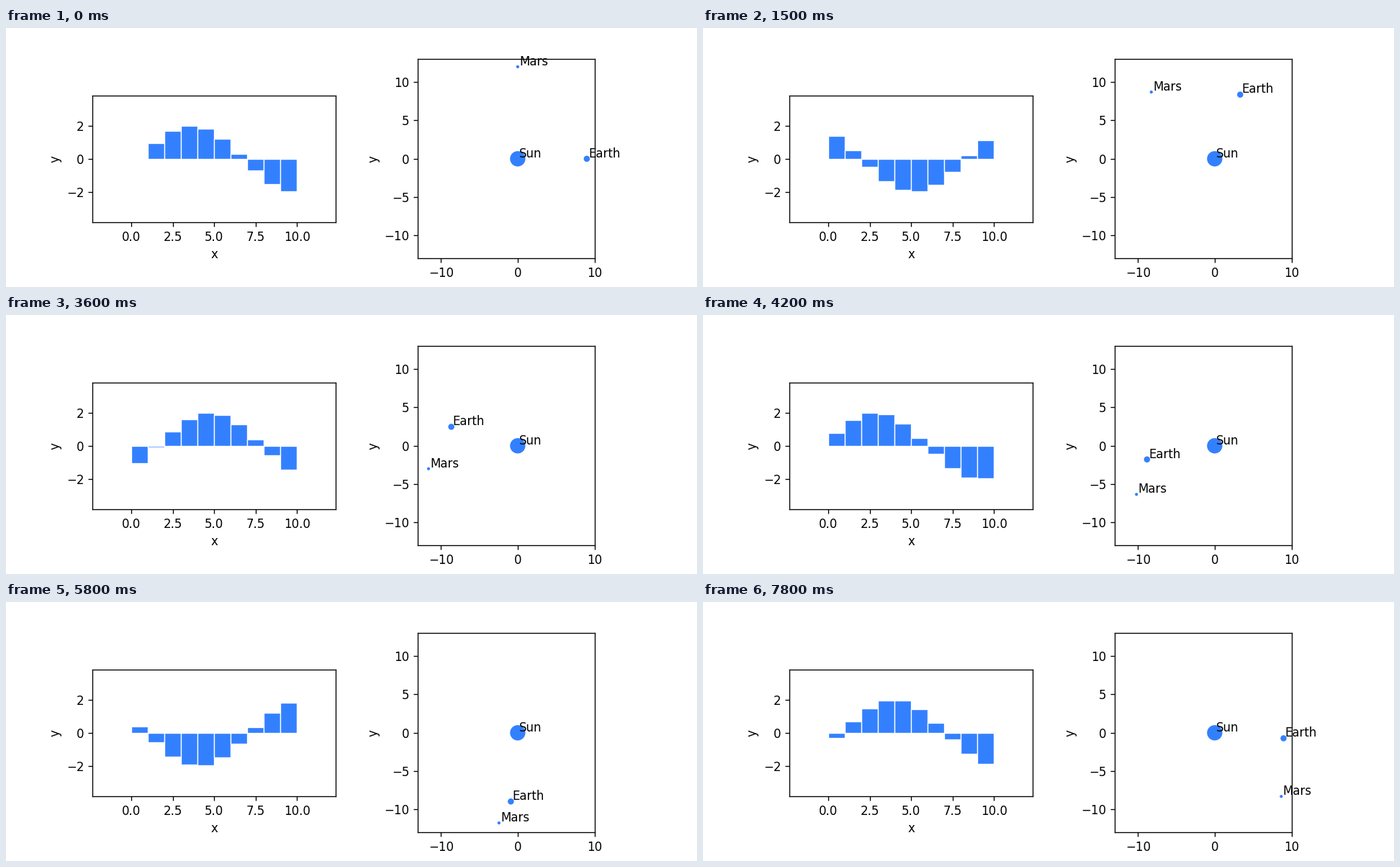
Animation, 960 px wide and 360 px high, one loop 7900 ms. Source, as a matplotlib script:

```python
import numpy as np
import matplotlib.pyplot as plt
from matplotlib.animation import FuncAnimation
from matplotlib.patches import Circle

FRAMES = 79
INTERVAL = 100
BLUE = "#3380ff"
BODIES = [("Sun", 1.0), ("Earth", 0.4), ("Mars", 0.2)]
LABEL_SHIFT = 0.2

plt.rcParams["font.family"] = "DejaVu Sans"
fig, (wave_ax, orbit_ax) = plt.subplots(1, 2, figsize=(8, 3), dpi=120)


def setup(ax, xlim, ylim, xticks, yticks):
    ax.set(xlim=xlim, ylim=ylim, xticks=xticks, yticks=yticks,
           xlabel="x", ylabel="y", aspect="equal")


setup(wave_ax, (-2.35, 12.35), (-3.83, 3.83),
      np.arange(0, 11, 2.5), [-2, 0, 2])
setup(orbit_ax, (-13, 10), (-13, 13), [-10, 0, 10], range(-10, 11, 5))

steps = np.arange(10)
bars = wave_ax.bar(steps, np.zeros(10), width=1, align="edge",
                   color=BLUE, edgecolor="white", linewidth=0.8)
dots = [orbit_ax.add_patch(Circle((0, 0), r, color=BLUE, linewidth=0))
        for _, r in BODIES]
labels = [orbit_ax.text(0, 0, name) for name, _ in BODIES]


def positions(turn):
    earth = 2 * np.pi * turn
    mars = 4 * turn
    return [(0, 0),
            (9 * np.cos(earth), 9 * np.sin(earth)),
            (-12 * np.sin(mars), 12 * np.cos(mars))]


def update(i):
    turn = i / FRAMES
    for bar, h in zip(bars, 2 * np.sin(4 * np.pi * turn + steps / 2)):
        bar.set_height(h)
    for dot, label, (x, y) in zip(dots, labels, positions(turn)):
        dot.center = x, y
        label.set_position((x + LABEL_SHIFT, y + LABEL_SHIFT))
    return [*bars, *dots, *labels]


anim = FuncAnimation(fig, update, frames=FRAMES, interval=INTERVAL,
                     repeat=True, repeat_delay=0)
plt.show()
```
